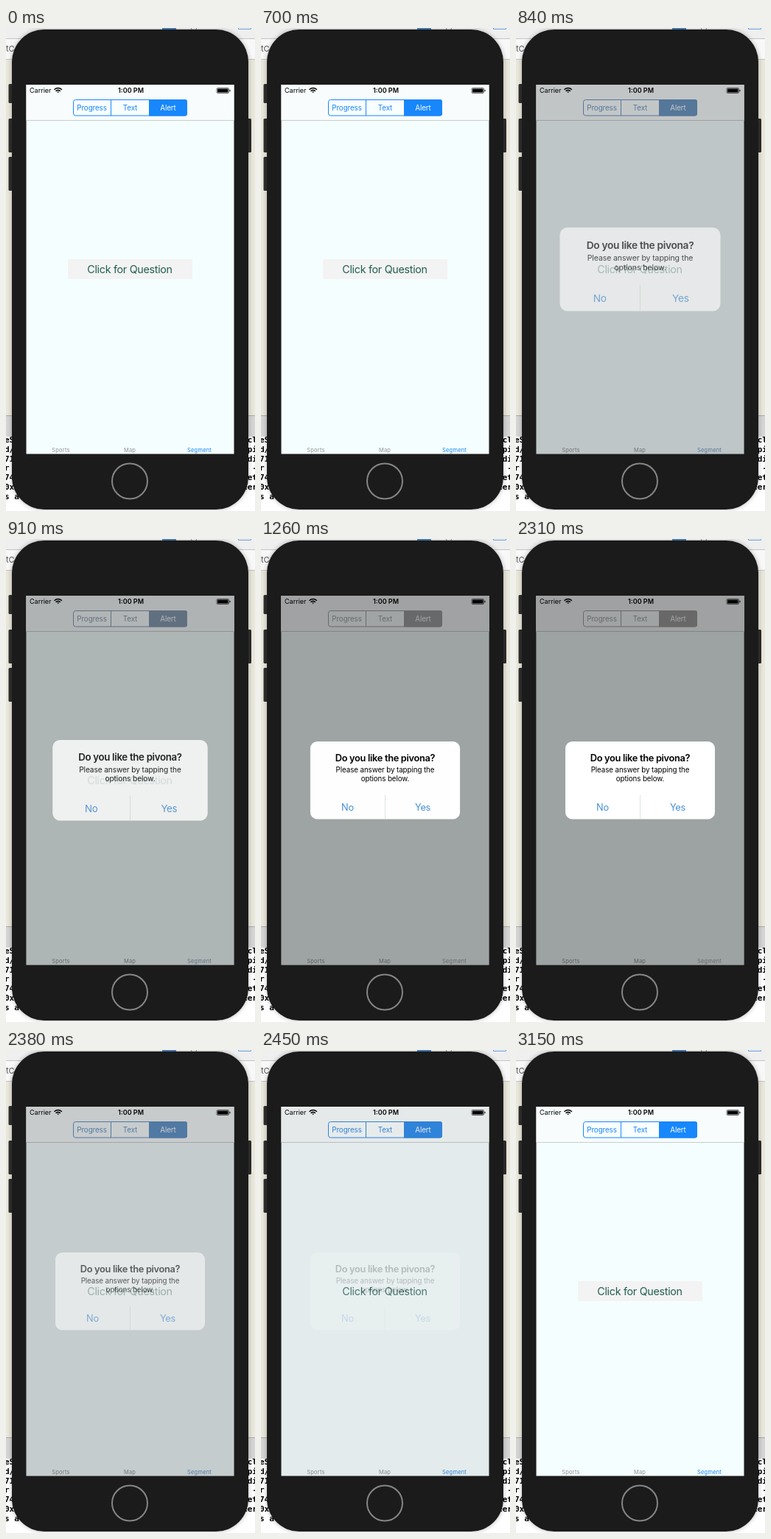
Recreate the animation shown at these times as an HTML page. Size 338 by 656 pixels, loop 3.22 s.

```html
<!DOCTYPE html>
<html lang="en">
<head>
<meta charset="utf-8">
<title>Alert demo</title>
<style>
  html, body { margin: 0; width: 100%; height: 100%; overflow: hidden; background: #e9e6da; }
  svg { display: block; width: 338px; height: 656px; --tint: #1787fb; font-family: Inter, "Liberation Sans", sans-serif; }
  .mid { text-anchor: middle; }
  .status { font-size: 9px; }
  .seg { font-size: 9.8px; letter-spacing: -.01em; fill: var(--tint); }
  .tab { font-size: 7.5px; letter-spacing: .025em; fill: #929292; }
  .button { font-size: 14.3px; letter-spacing: -.02em; fill: #1f5e50; }
  .title { font-size: 12.8px; font-weight: 600; letter-spacing: -.024em; }
  .body { font-size: 9.8px; letter-spacing: -.01em; }
  .action { font-size: 12.8px; letter-spacing: -.02em; fill: #4590da; }
  .log { font: bold 11px "DejaVu Sans Mono", monospace; white-space: pre; }
</style>
</head>
<body>
<svg viewBox="0 0 338 656">
  <defs>
    <filter id="blur" x="-10%" y="-10%" width="120%" height="120%"><feGaussianBlur stdDeviation="3"/></filter>
  </defs>

  <!-- desktop behind the phone -->
  <rect width="338" height="42" fill="#f8f8f8"/>
  <rect width="338" height="14" fill="#efefef"/>
  <path d="M0 14.5H338M0 42.5H338" stroke="#c4c4c4"/>
  <path d="M212 1H231" stroke="#4f86c6" stroke-width="2"/>
  <circle cx="255" cy="-1" r="4" fill="none" stroke="#999"/>
  <path d="M315.500 0V1.500H332.500V0" fill="none" stroke="#6aa0e0"/>
  <text x="0" y="32" font-size="11" fill="#555">tC</text>
  <rect y="526" width="338" height="29" fill="#d4d4d4"/>
  <path d="M0 526.500H338" stroke="#aaa"/>
  <rect y="555" width="338" height="101" fill="#fff"/>
  <g id="log" class="log"></g>

  <!-- phone -->
  <rect x="8" y="2" width="321" height="652" rx="44" fill="#000" opacity=".28" filter="url(#blur)"/>
  <g fill="#2a2a2a">
    <rect x="3.500" y="76" width="8" height="26" rx="1.500"/>
    <rect x="3.500" y="123" width="8" height="46" rx="1.500"/>
    <rect x="3.500" y="175" width="8" height="46" rx="1.500"/>
    <rect x="325" y="123" width="8" height="46" rx="1.500"/>
  </g>
  <rect x="8" y="2" width="321" height="652" rx="44" fill="#1b1b1b"/>
  <circle cx="168" cy="615.500" r="24" fill="none" stroke="#868686" stroke-width="2"/>

  <!-- screen -->
  <rect x="27.500" y="77" width="282" height="501.500" fill="#f5feff"/>
  <rect x="27.500" y="77" width="282" height="48" fill="#f8fcfd"/>
  <path d="M27.500 125.500H309.500" stroke="#c9cdce"/>

  <text class="status" x="32" y="88">Carrier</text>
  <g fill="none" stroke="#000" stroke-width="1.500">
    <path d="M65.500 83.700Q70.700 79.200 75.900 83.700M67.500 85.700Q70.700 83 73.900 85.700"/>
    <path d="M69.200 86.600H72.200L70.700 88.300Z" fill="#000" stroke="none"/>
  </g>
  <text class="status mid" x="169.500" y="88" font-weight="600">1:00 PM</text>
  <rect x="286" y="81.500" width="16.500" height="7" rx="1.500" fill="none" stroke="#000" stroke-width=".6"/>
  <rect x="287" y="82.500" width="14.500" height="5" rx=".6"/>
  <path d="M304 83.800V86.200" stroke="#000"/>

  <rect x="91.500" y="97.500" width="154" height="21.500" rx="3" fill="#f9feff" stroke="var(--tint)"/>
  <path d="M142.500 97.500V119" stroke="var(--tint)"/>
  <path d="M194 97H243Q246 97 246 100V116.500Q246 119.500 243 119.500H194Z" fill="var(--tint)"/>
  <g class="seg mid">
    <text x="116.500" y="112">Progress</text>
    <text x="168.500" y="112">Text</text>
    <text x="220" y="112" style="fill:#fff">Alert</text>
  </g>

  <rect id="plate" x="84" y="314" width="169" height="27" fill="#f3f3f3"/>
  <text class="button mid" x="168" y="333">Click for Question</text>

  <g class="tab mid">
    <text x="74.500" y="576">Sports</text>
    <text x="168" y="576">Map</text>
    <text x="262.500" y="576" style="fill:var(--tint)">Segment</text>
  </g>

  <rect id="dim" x="27.500" y="77" width="282" height="501.500" opacity="0"/>

  <g id="alert" opacity="0">
    <rect x="67" y="275" width="203" height="105.500" rx="9.500" fill="#fff"/>
    <path d="M168.500 347.500V380" stroke="#e2e4e5"/>
    <g class="mid">
      <text class="title" x="168.500" y="302">Do you like the pivona?</text>
      <text class="body" x="168.500" y="317">Please answer by tapping the</text>
      <text class="body" x="168.500" y="329">options below.</text>
      <text class="action" x="117.500" y="369">No</text>
      <text class="action" x="219.500" y="369">Yes</text>
    </g>
  </g>
</svg>
<script>
const LOOP = 3220, STEP = 70;
const SHOW = 746, HIDE = 2338;
const el = id => document.getElementById(id);
const svg = document.querySelector("svg");
const mix = (a, b, k) => a + (b - a) * k;

// console lines peeking out on both sides
const left = ["eS", "d/", "71", "r ", "74", "0x", "s a"];
const right = ["cl", "pi", "di", "- ", "et", "eer", ""];
el("log").innerHTML = left.map((s, i) => {
  const y = 563 + i * 12.8;
  return `<text x="-2" y="${y}">${s}</text><text x="341" y="${y}" text-anchor="end">${right[i]}</text>`;
}).join("");

// how far the alert is present, 0 to 1
function presence(t) {
  if (t < SHOW) return 0;
  if (t < HIDE) return 1 - Math.exp((SHOW - t) / 100);
  const k = Math.exp((HIDE - t) / 70);
  return k < .01 ? 0 : k;
}

function draw(now) {
  const t = Math.floor(now % LOOP / STEP) * STEP;
  const k = presence(t);
  const scale = t < HIDE ? 1 + .19 * (1 - k) : 1;
  const tint = [23, 135, 251].map(c => Math.round(mix(c, 163, k)));
  svg.style.setProperty("--tint", `rgb(${tint})`);
  el("dim").setAttribute("opacity", .36 * k);
  el("plate").setAttribute("opacity", Math.max(0, 1 - 5 * k));
  el("alert").setAttribute("opacity", k);
  el("alert").setAttribute("transform",
    `translate(168.5 327.7) scale(${scale}) translate(-168.5 -327.7)`);
}

const start = performance.now();
function tick() {
  draw(performance.now() - start);
  requestAnimationFrame(tick);
}
tick();
</script>
</body>
</html>
```
